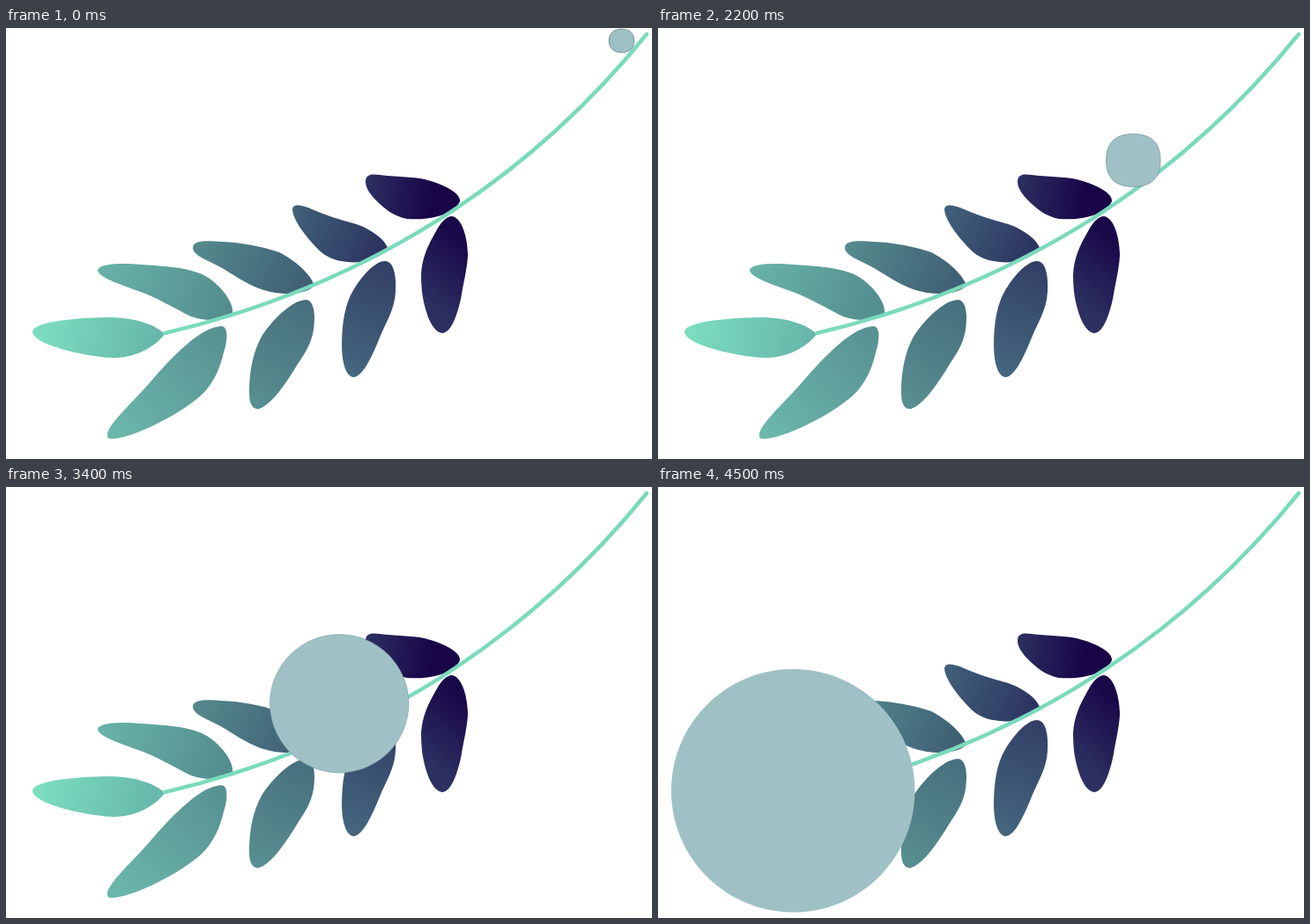
An HTML page that plays this animation: 733 px wide and 490 px high, repeating every 4600 ms.

```html
<!DOCTYPE html>
<html lang="en">
<head>
<meta charset="utf-8">
<title>Rolling ball on a branch</title>
<style>
html, body { margin: 0; width: 100%; height: 100%; overflow: hidden; background: #fff; }
svg { display: block; width: 733px; height: 490px; }
</style>
</head>
<body>
<svg viewBox="0 0 733 490">
  <defs></defs>
  <!-- data-g: gradient start, start colour, gradient end, end colour -->
  <g id="leaves">
    <path data-g="30 335 #7ddfc1 180 365 #65b4a8" d="M30 345C32 333 85 329 120 329C150 330 170 338 180 348C168 364 145 375 122 375C90 374 30 360 30 345Z"/>
    <path data-g="105 275 #69b3a8 257 325 #528b8d" d="M104 275C106 267 135 267 155 269C185 271 212 273 228 283C245 294 259 312 257 326C245 333 228 334 210 328C190 318 170 306 150 299C128 291 104 283 104 275Z"/>
    <path data-g="115 465 #6cb9ac 250 340 #578f91" d="M115 464C113 452 145 425 165 401C190 372 222 339 245 339C253 340 251 358 247 369C243 387 235 405 221 418C195 441 140 468 119 467Q115 467 115 464Z"/>
    <path data-g="212 245 #558b8d 350 298 #3d5b72" d="M212 250C212 241 228 242 245 243C270 244 295 250 310 255C328 264 346 280 350 293C342 301 325 304 305 301C280 297 262 283 247 274C230 264 213 260 212 250Z"/>
    <path data-g="280 430 #588f91 348 315 #466f7d" d="M276 415C276 385 282 365 291 349C304 330 325 309 341 309C351 311 351 330 349 343C346 362 337 372 328 387C315 408 300 429 287 433C278 434 276 424 276 415Z"/>
    <path data-g="325 205 #416179 432 250 #2b3260" d="M325 207C325 198 338 202 347 206C365 214 380 218 394 222C412 227 430 240 433 250C425 262 405 268 388 266C365 264 357 255 348 245C338 234 326 218 325 207Z"/>
    <path data-g="388 390 #44667e 440 270 #323f66" d="M381 360C381 335 385 314 393 300C402 284 418 265 430 265C441 265 443 285 442 300C441 320 431 335 424 352C416 372 405 397 394 397C384 395 381 376 381 360Z"/>
    <path data-g="410 180 #2b2f60 485 190 #180447" d="M408 175C408 166 415 166 424 167C440 169 462 169 475 172C495 177 516 187 515 197C508 213 480 219 455 217C440 214 430 206 420 196C414 190 408 182 408 175Z"/>
    <path data-g="472 310 #2c3162 524 250 #1a0949" d="M471 280C472 260 480 245 488 231C493 221 500 214 506 214C518 216 524 240 524 259C523 275 519 290 517 303C513 325 505 347 495 347C481 345 474 315 472 300Q471 290 471 280Z"/>
  </g>
  <path d="M180 347C380 300 575 195 727 7" fill="none" stroke="#7adabc" stroke-width="4.4" stroke-linecap="round"/>
  <path id="ball" fill="#9fc1c6" stroke="#5d7f85" stroke-width=".8"/>
</svg>
<script>
const LOOP = 4600, STEP = 100;
const ball = document.getElementById('ball');
const defs = document.querySelector('defs');

document.querySelectorAll('#leaves path').forEach((leaf, i) => {
  const [x1, y1, from, x2, y2, to] = leaf.dataset.g.split(' ');
  defs.innerHTML += `<linearGradient id="g${i}" gradientUnits="userSpaceOnUse"
    x1="${x1}" y1="${y1}" x2="${x2}" y2="${y2}">
    <stop stop-color="${from}"/><stop offset="1" stop-color="${to}"/></linearGradient>`;
  leaf.setAttribute('fill', `url(#g${i})`);
});

// time, centre x, centre y, half width, half height, corner fullness, outline opacity
const keys = [
  [0, 698.5, 14.5, 14.3, 13.3, .62, 1],
  [700, 660.7, 51.5, 18, 17.2, .7, .9],
  [1500, 589.2, 113, 25.2, 24.4, .72, .8],
  [2200, 539.3, 150.5, 30.8, 30, .67, .7],
  [3100, 443.5, 219, 59, 58.7, .56, .5],
  [3700, 305.2, 274.7, 100.2, 100.2, .552, .35],
  [4500, 153.2, 345.3, 138.2, 138.2, .552, 0]
];

// slope of value v at key i
function slope(i, v) {
  const a = keys[Math.max(i - 1, 0)], b = keys[Math.min(i + 1, keys.length - 1)];
  return (b[v] - a[v]) / (b[0] - a[0]);
}

// smooth curve through the keys
function valueAt(t, v) {
  let i = 0;
  while (i < keys.length - 2 && t >= keys[i + 1][0]) i++;
  const a = keys[i], b = keys[i + 1], span = b[0] - a[0];
  const u = (t - a[0]) / span, w = 1 - u;
  return a[v] * w * w * (1 + 2 * u) + b[v] * u * u * (3 - 2 * u)
    + span * u * w * (w * slope(i, v) - u * slope(i + 1, v));
}

function draw(now) {
  const t = Math.floor(now % LOOP / STEP) * STEP;
  const [x, y, rx, ry, k, line] = [1, 2, 3, 4, 5, 6].map(v => valueAt(t, v));
  const p = (a, b) => `${x + a * rx} ${y + b * ry} `;
  ball.setAttribute('d', 'M' + p(1, 0)
    + 'C' + p(1, k) + p(k, 1) + p(0, 1)
    + 'C' + p(-k, 1) + p(-1, k) + p(-1, 0)
    + 'C' + p(-1, -k) + p(-k, -1) + p(0, -1)
    + 'C' + p(k, -1) + p(1, -k) + p(1, 0) + 'Z');
  ball.setAttribute('stroke-opacity', Math.min(1, Math.max(0, line)));
}

const start = performance.now();
function tick() {
  draw(performance.now() - start);
  requestAnimationFrame(tick);
}
tick();
</script>
</body>
</html>
```
